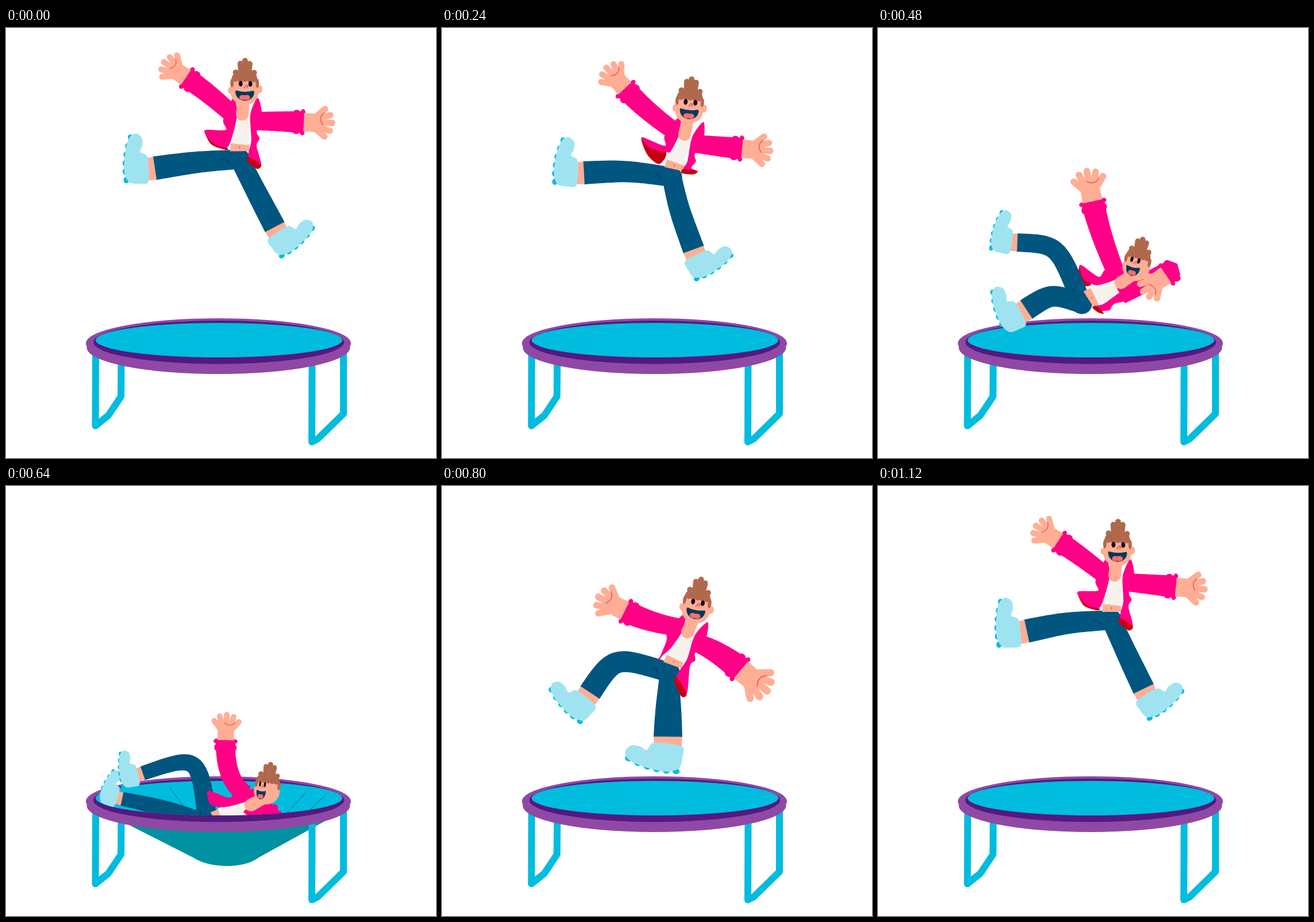
An HTML page with a canvas that plays this animation: 748x748 px, repeating every 1.28 s.

```html
<!DOCTYPE html>
<html>
<head>
<meta charset="utf-8">
<style>
html, body { margin: 0; width: 100%; height: 100%; overflow: hidden; background: #fff; }
canvas { display: block; width: 748px; height: 748px; }
</style>
</head>
<body>
<canvas id="stage" width="748" height="748"></canvas>
<script>
const ctx = document.getElementById('stage').getContext('2d');
const C = {
  pink: '#ff0086', red: '#c60010', jean: '#00567f', skin: '#ffae95', shirt: '#f5f2ec',
  shoe: '#a0e3f0', stud: '#00bcdc', hair: '#b0694d', ink: '#003a5c', tongue: '#ff6b6b',
  line: '#d4504a', rim: '#8f49a5', dark: '#521a80', mat: '#00bcde', under: '#0092a2', eye: '#1b0a20'
};
const { PI, sin, cos, atan2, hypot } = Math;

// Arms are elbow, wrist, width; legs are knee, ankle, width.
// flap: tip of the open jacket side; lift: how far its hem rises; hem: other side, from the belly.
// side: where the second foot points; turn: how far the face looks aside.
const poses = {
  top: {
    head: [415, 107, 1], neck: [411, 150], belly: [405, 212], flap: [346, 178], lift: 2, hem: [41, -22],
    arms: [[352, 112, 313, 86, 36], [475, 162, 518, 164, 38]],
    legs: [[330, 233, 258, 244, 41], [438, 290, 468, 347, 38]], side: -1, turn: 0
  },
  drop: {
    head: [430, 139, 5], neck: [422, 185], belly: [402, 243], flap: [348, 190], lift: 22, hem: [42, 8],
    arms: [[355, 145, 318, 105, 37], [480, 206, 522, 210, 38]],
    legs: [[320, 248, 246, 252, 40], [412, 315, 438, 386, 38]], side: -1, turn: 0
  },
  dive: {
    head: [445, 299, 19], neck: [419, 331], belly: [370, 360], flap: [352, 294], lift: 20, hem: [50, 32],
    arms: [[388, 262, 368, 217, 45], [585, 322, 523, 342, 45]],
    legs: [[300, 322, 244, 297, 36], [320, 402, 291, 458, 47]], side: 1, turn: 0
  },
  sink: {
    head: [454, 529, 8], neck: [426, 555], belly: [365, 580], flap: [352, 530], lift: 8, hem: [20, -10],
    arms: [[380, 515, 382, 442, 34], [450, 548, 464, 576, 26]],
    legs: [[336, 466, 237, 500, 25], [272, 559, 201, 544, 24]], side: 1, turn: 1
  },
  spring: {
    head: [442, 212, 10], neck: [427, 254], belly: [400, 309], flap: [378, 300], lift: 5, hem: [46, -36],
    arms: [[360, 238, 318, 217, 40], [478, 285, 520, 320, 45]],
    legs: [[300, 295, 257, 360, 40], [394, 370, 393, 437, 50]], side: 1, turn: 0
  }
};

const steps = [
  { at: 0, a: 'top' },
  { at: 120, a: 'top', b: 'drop', t: .45 },
  { at: 240, a: 'drop' },
  { at: 320, a: 'drop', b: 'dive', t: .45 },
  { at: 400, a: 'dive' },
  { at: 480, a: 'dive', b: 'sink', t: .5 },
  { at: 560, a: 'dive', b: 'sink', t: .95, dy: 16, low: 686 },
  { at: 640, a: 'sink', low: 661 },
  { at: 720, a: 'sink', b: 'spring', t: .45, dy: 35, low: 685 },
  { at: 800, a: 'spring' },
  { at: 880, a: 'spring', b: 'top', t: .6 },
  { at: 960, a: 'spring', b: 'top', t: .85 },
  { at: 1120, a: 'spring', b: 'top', t: .95 }
];

const lerp = (a, b, t) => a + (b - a) * t;

function blend(a, b, t) {
  if (typeof a === 'number') return lerp(a, b, t);
  return a.map((v, i) => blend(v, b[i], t));
}

// arms and legs follow a little behind the body
function mixPose(a, b, t) {
  const late = t - t * (1 - t) / 2, out = {};
  for (const k in a) out[k] = blend(a[k], b[k], k === 'arms' || k === 'legs' ? late : t);
  return out;
}

function fill(color) { ctx.fillStyle = color; ctx.fill(); }

function oval(x, y, rx, ry, color) {
  ctx.beginPath();
  ctx.ellipse(x, y, rx, ry, 0, 0, 2 * PI);
  fill(color);
}

// smooth closed curve through the points
function blob(p, color) {
  const n = p.length, P = i => p[(i + n) % n];
  const pull = (i, k) => P(i).map((v, j) => v + k * (P(i + 1)[j] - P(i - 1)[j]) / 7);
  ctx.beginPath();
  ctx.moveTo(...P(0));
  for (let i = 0; i < n; i++) ctx.bezierCurveTo(...pull(i, 1), ...pull(i + 1, -1), ...P(i + 1));
  fill(color);
}

function line(color, width, ...points) {
  ctx.beginPath();
  for (const p of points) ctx.lineTo(...p);
  ctx.strokeStyle = color;
  ctx.lineWidth = width;
  ctx.stroke();
}

// point and direction on a bezier of any degree
function along(p, t) {
  let d;
  while (p.length > 1) {
    if (p.length === 2) d = atan2(p[1][1] - p[0][1], p[1][0] - p[0][0]);
    p = p.slice(1).map((v, i) => blend(p[i], v, t));
  }
  return { x: p[0][0], y: p[0][1], d };
}

function limb(p, w0, w1, color) {
  const edge = [[], []];
  for (let t = 0; t <= 1; t += 1 / 32) {
    const { x, y, d } = along(p, t), w = lerp(w0, w1, t) / 2;
    edge[0].push([x - sin(d) * w, y + cos(d) * w]);
    edge[1].unshift([x + sin(d) * w, y - cos(d) * w]);
  }
  ctx.beginPath();
  for (const q of edge.flat()) ctx.lineTo(...q);
  fill(color);
  return along(p, 1);
}

function local(x, y, turn, sx, sy, paint) {
  ctx.save();
  ctx.translate(x, y);
  ctx.rotate(turn);
  ctx.scale(sx, sy);
  paint();
  ctx.restore();
}

function shoe() {
  for (let x = -17; x < 60; x += 14.5) oval(x, 39 - 12 * (x / 57) ** 2, 5.5, 4.5, C.stud);
  blob([[21, 0], [-21, 0], [-24, 18], [-21, 33], [-6, 40], [14, 40], [38, 36], [56, 29], [62, 18], [54, 8], [41, 8], [30, 12]], C.shoe);
}

function leg(hip, [kx, ky, x, y, w], side) {
  const knee = [kx, ky], { d } = limb([hip, knee, knee, [x, y]], 34, w, C.jean);
  const s = .35 + .65 * w / 40, out = r => [x + cos(d) * r, y + sin(d) * r];
  limb([out(-1), out(14 * s)], w - 1, w - 2, C.skin);
  // the toe stands almost square to the shin
  local(...out(11 * s), d + side * 1.68, s, -side * s, shoe);
}

function sleeve(shoulder, [ex, ey, x, y, w]) {
  const { d } = limb([shoulder, [ex, ey], [x, y]], 31, w, C.pink);
  local(x, y, d, 1, 1, () => {
    for (let i = 0; i < 4; i++) oval(-2, (i - 1.5) * w / 3.2, 4, 5, C.pink);
    for (const k of [-1, 1]) oval(-13, k * w * .44, 6, 4.5, C.pink);
  });
}

function hand([ex, ey, x, y, w], flip) {
  const s = w / 40;
  local(x, y, atan2(y - ey, x - ex), s, s * flip, () => {
    limb([[0, 0], [30, 0]], 34, 33, C.skin);
    oval(27, 0, 13, 18, C.skin);
    for (let i = 0; i < 5; i++) {
      const a = .6 - .29 * i, r = 46 + 6 * sin(PI * i / 4);
      line(C.skin, 11.5, [24, 12 * sin(a) * 2], [r * cos(a), r * sin(a)]);
    }
    line(C.line, 1.3, [36, 19], [31, 12], [31, 4], [35, -3]);
  });
}

function face(turn) {
  const look = -11 * turn;
  oval(26 + look, -1, 5, 7, C.skin);
  oval(-25 - look, 2, 4, 6, C.skin);
  oval(0, 2, 25, 25.5, C.skin);
  blob([[-24, -8], [-20, -26], [0, -31], [18, -29], [24, -8], [18, -16], [-18, -16]], C.hair);
  for (let x = -16; x < 20; x += 8) {
    line(C.hair, 10, [x * .8, -27], [x, -50 + .08 * x * x]);
    oval(x, -18, 5, 5, C.hair);
  }
  for (const x of [-22, 22]) oval(x, -11, 3, 8, C.hair);
  ctx.translate(look, 0);
  ctx.scale(1 - .45 * turn, 1);
  for (const x of [-7, 10]) oval(x, -10, 3.5, 5, C.eye);
  line(C.line, 1.4, [-1, -3], [3, -8], [6, -7], [4, -3]);
  ctx.beginPath();
  ctx.moveTo(-14, 4);
  ctx.quadraticCurveTo(0, 8, 15, 4);
  ctx.bezierCurveTo(15, 22, -13, 22, -14, 4);
  ctx.strokeStyle = C.ink;
  ctx.lineWidth = 4;
  ctx.stroke();
  fill(C.ink);
  for (const x of [-3, 4]) oval(x, 14, 6, 4.5, C.tongue);
}

function person(p) {
  const { head, neck, belly, flap, arms, legs, hem: [hx, hy] } = p;
  const dx = neck[0] - belly[0], dy = neck[1] - belly[1], d = hypot(dx, dy);
  // body space: x across, y from belly to neck
  const at = (x, y) => [belly[0] + (dx * y - dy * x) / d, belly[1] + (dy * y + dx * x) / d];
  const hip = at(3, -16), hemL = at(-21, p.lift), waist = at(-25, -2);
  const sag = (q, r) => { const m = blend(flap, q, .45); return [m[0] - r * .5, m[1] + r]; };

  blob([flap, sag(waist, 9), waist, hemL], C.red);
  leg(hip, legs[1], Math.sign(p.side) || 1);
  leg(hip, legs[0], 1);
  oval(...hip, 18, 18, C.jean);
  line(C.ink, 1.3, at(-27, -19), at(-20, -20), at(-14, -27));
  limb([at(0, 16), at(2, -2)], 30, 34, C.skin);
  line(C.line, 1.3, at(1, 3), at(1, 6));
  limb([at(0, d), at(0, 10)], 26, 33, C.shirt);

  sleeve(at(-20, d), arms[0]);
  sleeve(at(20, d - 10), arms[1]);
  blob([at(-18, d + 27), at(-32, d - 13), at(-26, d - 30), flap, sag(hemL, 8), hemL, at(-13, 26), at(-9, d)], C.pink);
  blob([at(24, d + 31), at(34, d + 3), at(28, 35), at(34, 23), at(30, 10), at(hx, hy), at(18, hy / 2), at(20, 19), at(14, d)], C.pink);
  blob([at(18, hy / 2), at(hx, hy), at(hx - 6, hy - 8), at(17, hy / 2 - 8)], C.red);

  limb([[head[0] - 1, head[1] + 12], neck], 20, 22, C.skin);
  oval(...neck, 11, 11, C.skin);
  const size = 1 - .1 * p.turn;
  local(head[0], head[1], head[2] * PI / 180, size, size, () => face(p.turn));
  hand(arms[0], 1);
  hand(arms[1], -1);
}

function trampoline(low) {
  if (low) {
    ctx.beginPath();
    ctx.moveTo(195, 580);
    ctx.lineTo(325, low - 15);
    ctx.bezierCurveTo(355, low + 5, 415, low + 5, 440, low - 15);
    ctx.lineTo(560, 580);
    fill(C.under);
  }
  line(C.mat, 12, [156, 565], [155.5, 692], [178, 674], [200, 641], [200.5, 580]);
  line(C.mat, 12, [532.5, 580], [532, 720], [542, 715], [587, 671], [587, 562]);
  oval(369.5, 556, 229, 46, C.rim);
  oval(369.5, 548.5, 230.5, 43.5, C.rim);
  oval(370, 546.7, 218, 37.7, C.dark);
  oval(370.5, 543, 214.5, 30, C.mat);
  if (low) {
    line(C.under, 1.3, [285, 525], [308, 556]);
    line(C.under, 1.3, [490, 567], [523, 532]);
    line(C.under, 1.3, [530, 562], [554, 539]);
  }
}

function draw({ a, b = a, t = 0, dy = 0, low = 0 }) {
  ctx.clearRect(0, 0, 748, 748);
  ctx.lineCap = ctx.lineJoin = 'round';
  trampoline(low);
  ctx.save();
  // the near edge of the mat hides whatever sinks below it
  ctx.beginPath();
  ctx.rect(0, 0, 748, 543);
  ctx.ellipse(370.5, 543, 214.5, 30, 0, 0, 2 * PI);
  ctx.clip();
  ctx.translate(0, dy);
  person(mixPose(poses[a], poses[b], t));
  ctx.restore();
}

let start, shown;
function tick(now) {
  start ??= now;
  const t = (now - start) % 1280, step = steps.findLast(s => s.at <= t) || steps[0];
  if (step !== shown) draw(shown = step);
  requestAnimationFrame(tick);
}
draw(shown = steps[0]);
requestAnimationFrame(tick);
</script>
</body>
</html>
```
